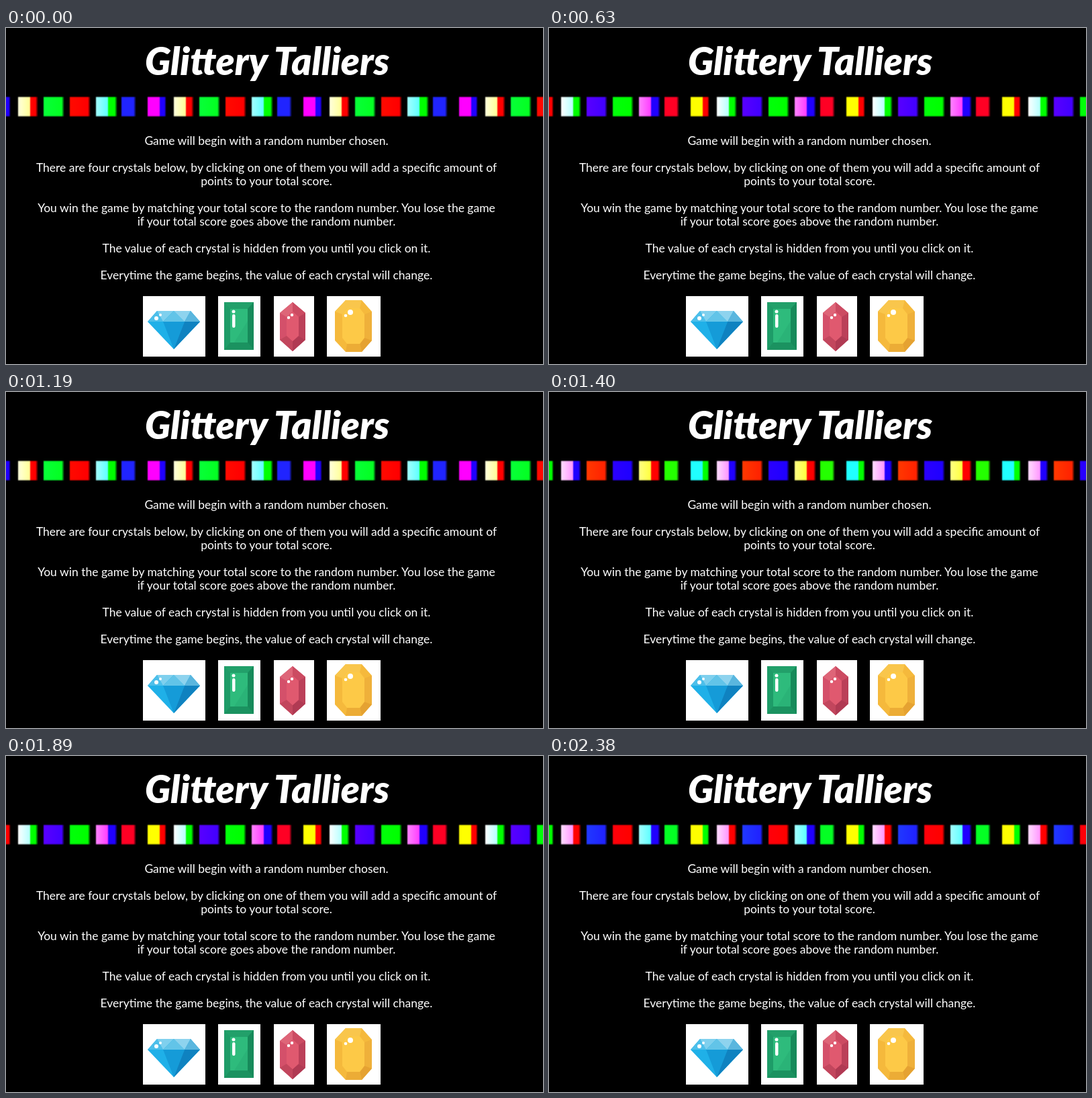
These frames come from a looping animation (800 px wide and 500 px high, 2450 ms). An HTML page:

```html
<!DOCTYPE html>
<html lang="en">
<head>
<meta charset="utf-8">
<title>Glittery Talliers</title>
<style>
  html, body { margin: 0; width: 100%; height: 100%; overflow: hidden; background: #000; }
  #stage { position: relative; width: 800px; height: 500px; overflow: hidden; }
  #lights {
    position: absolute; left: 0; top: 102px; width: 800px; height: 30px;
    background-size: 232px 100%;
  }
  #lights::after {
    content: ""; position: absolute; inset: 0;
    background: linear-gradient(#000a, #0000 2px, #0000 28px, #000a);
  }
  svg { position: absolute; left: 0; top: 0; }
  text { fill: #fff; text-anchor: middle; font: 17.5px Lato, sans-serif; }
  .title { font: italic 900 57px Lato, cursive; }
</style>
</head>
<body>
<div id="stage">
  <div id="lights"></div>
  <svg width="800" height="500" viewBox="0 0 800 500">
    <text class="title" x="389" y="70">Glittery Talliers</text>
    <text x="388" y="174">Game will begin with a random number chosen.</text>
    <text x="388" y="214">There are four crystals below, by clicking on one of them you will add a specific amount of</text>
    <text x="388" y="234">points to your total score.</text>
    <text x="388" y="274">You win the game by matching your total score to the random number. You lose the game</text>
    <text x="388" y="294">if your total score goes above the random number.</text>
    <text x="388" y="334">The value of each crystal is hidden from you until you click on it.</text>
    <text x="388" y="374">Everytime the game begins, the value of each crystal will change.</text>

    <path fill="#fff" d="M204 399h93v90h-93zM316 399h63v90h-63zM399 399h60v90h-60zM478 399h80v90h-80z"/>

    <g id="diamond">
      <path fill="#1fb0e8" d="M211 437 225 421H275L289 437 250 478z"/>
      <path fill="#4dbfea" d="M211 437 225 421 234 437z"/>
      <path fill="#7fd0ee" d="M225 421H250L234 437z"/>
      <path fill="#62c4e8" d="M250 421 266 437H234z"/>
      <path fill="#8ed3ee" d="M250 421H275L266 437z"/>
      <path fill="#5ab6de" d="M275 421 289 437H266z"/>
      <path fill="#159bd8" d="M234 437H266L250 478z"/>
      <path fill="#0f82c0" d="M266 437H289L250 478z"/>
      <g fill="#fff"><circle cx="224" cy="432" r="3"/><circle cx="230" cy="427" r="2"/></g>
    </g>

    <g id="emerald">
      <path fill="#1e9c68" d="M325 408H369V479H325z"/>
      <path fill="#22a06a" d="M325 408H369L360 418H334z"/>
      <path fill="#178a5a" d="M369 408V479L360 468V418z"/>
      <path fill="#1b9260" d="M325 479H369L360 468H334z"/>
      <path fill="#2ebb7c" d="M334 418H360V468H334z"/>
      <path fill="#2ab377" d="M360 436V468H340z"/>
      <g fill="#fff"><circle cx="339" cy="422" r="2.5"/><rect x="337" y="426" width="4.5" height="20" rx="2.2"/></g>
    </g>

    <g id="ruby">
      <path fill="#d4506a" d="M427 408 446 424V464L427 481 408 464V424z"/>
      <path fill="#de6578" d="M427 408 408 424 418 430 427 422z"/>
      <path fill="#cc4b62" d="M427 408 446 424 436 430 427 422z"/>
      <path fill="#bb4059" d="M446 424V464L436 458V430z"/>
      <path fill="#b03a53" d="M446 464 427 481V466L436 458z"/>
      <path fill="#c2465d" d="M408 464 427 481V466L418 458z"/>
      <path fill="#e0596f" d="M427 422 436 430V458L427 466 418 458V430z"/>
      <g fill="#fff"><circle cx="421" cy="431" r="2.2"/><circle cx="426" cy="427" r="2.2"/></g>
    </g>

    <g id="amber">
      <path fill="#f5b93c" d="M506 405H530L545 422V465L530 482H506L490 465V422z"/>
      <path fill="#f9c64c" d="M506 405H530L527 417H508zM490 422 506 405 508 417 501 426z"/>
      <path fill="#efb03a" d="M545 422V465L534 461V426z"/>
      <path fill="#e5a232" d="M545 465 530 482 527 470 534 461z"/>
      <path fill="#ecac36" d="M530 482H506L508 470H527z"/>
      <path fill="#fdc947" d="M508 417H527L534 426V461L527 470H508L501 461V426z"/>
      <g fill="#fff"><circle cx="513" cy="423" r="4"/><circle cx="506" cy="428" r="2.3"/></g>
    </g>
  </svg>
</div>
<script>
  const TICK = 70, LOOP = 35;
  // Each lighting state lasts HOLD ticks; the loop opens LEAD ticks into the cycle.
  const HOLD = 3.1, LEAD = 12.1;
  const RGB = { R: [255, 0, 0], G: [0, 255, 0], B: [32, 0, 255] };
  // The red, green and blue channels swap places through all six orders.
  const STATES = ["RGB", "RBG", "GRB", "BRG", "GBR", "BGR"];
  const lights = document.getElementById("lights");

  // Adds weighted colours: mix(colour, weight, ...)
  function mix(...parts) {
    const sum = [0, 0, 0];
    for (let i = 0; i < parts.length; i += 2)
      parts[i].forEach((v, c) => sum[c] += v * parts[i + 1]);
    return `rgb(${sum.map(v => Math.min(255, Math.round(v)))})`;
  }

  // A bulb from a to b: main colour, then a side colour after the split.
  function bulb(a, b, from, to = from, side = to, split = b - 4) {
    return `#000 ${a - 1}px, ${from} ${a + 1}px, ${to} ${split - 1}px, ` +
           `${side} ${split + 1}px, ${side} ${b - 2}px, #000 ${b + 2}px`;
  }

  function strip(code) {
    const [p, q, s] = [...code].map(c => RGB[c]);
    const edge = mix(p, 1), pair = mix(p, 1, q, 1);
    return "linear-gradient(90deg, " + [
      `${edge} 0, ${edge} 4px, #000 7px`,
      bulb(18, 46, mix(q, 1, s, 1, p, .85), mix(q, 1, s, 1, p, .6), mix(q, 1), 36),
      bulb(56, 85, mix(s, 1, p, .22), mix(s, 1, p, .14)),
      bulb(95, 124, mix(q, 1, s, .04), mix(q, 1)),
      bulb(134, 164, mix(s, 1, p, 1, q, .5), mix(s, 1, p, 1, q, .25), mix(s, 1), 152),
      bulb(172, 192, mix(p, 1, s, .14)),
      `#000 210px, ${pair} 212px, ${pair} 228px, ${edge} 230px, ${edge} 232px`
    ].join(", ") + ")";
  }

  const strips = STATES.map(strip);
  const start = performance.now();
  let shown = -1;

  function draw(now) {
    const tick = Math.floor(Math.max(0, now - start) / TICK) % LOOP;
    const state = Math.floor((tick + LEAD) / HOLD) % STATES.length;
    if (state !== shown) {
      lights.style.backgroundImage = strips[state];
      shown = state;
    }
    requestAnimationFrame(draw);
  }
  draw(start);
</script>
</body>
</html>
```
